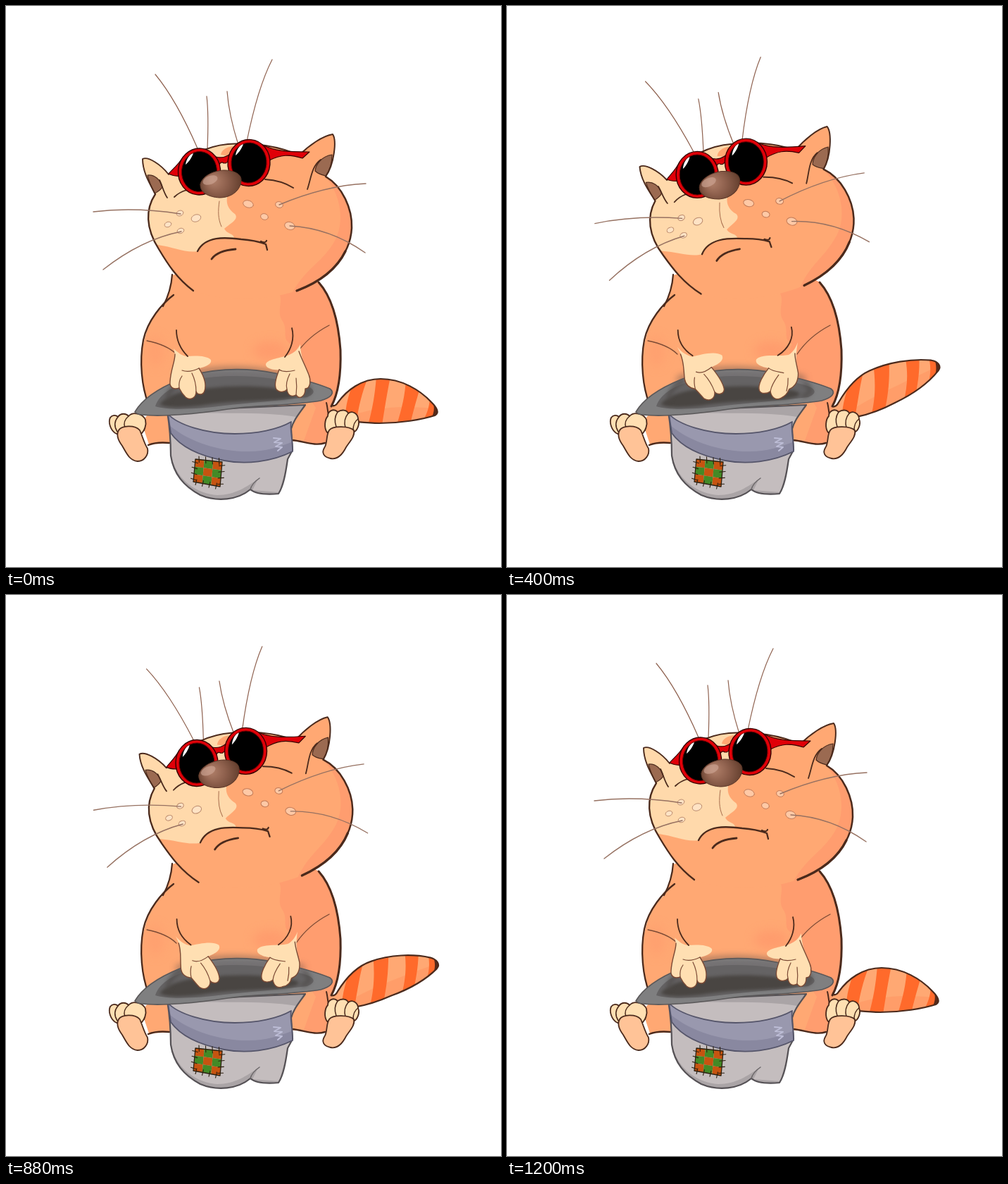
An HTML page with a canvas for the animation above (1.28 s loop, 703 px wide and 796 px high).

```html
<!DOCTYPE html>
<html lang="en">
<head>
<meta charset="utf-8">
<title>Cat with a hat</title>
<style>
html, body { margin: 0; width: 100%; height: 100%; overflow: hidden; background: #fff; }
canvas { display: block; width: 703px; height: 796px; }
</style>
</head>
<body>
<canvas id="stage" width="703" height="796"></canvas>
<script>
const ctx = document.getElementById('stage').getContext('2d');
const STEP = 80, LAST = 7, SLOTS = 16;
const INK = '#4b2a1c', THIN = '#7a4a35', SKIN = '#ffa873', SHADE = '#ff9d6f',
      CREAM = '#ffd9ab', PAW = '#ffdfb2', STRIPE = '#ff6a2b', RED = '#e00008';

ctx.lineCap = ctx.lineJoin = 'round';

const fill = (d, color) => {
  ctx.fillStyle = color;
  ctx.fill(new Path2D(d));
};
const line = (d, width = 2, color = INK) => {
  ctx.strokeStyle = color;
  ctx.lineWidth = width;
  ctx.stroke(new Path2D(d));
};
const shape = (d, color, width, ink) => {
  fill(d, color);
  line(d, width, ink);
};
const oval = (x, y, rx, ry, color, tilt = 0, width = 0, ink = INK) => {
  ctx.beginPath();
  ctx.ellipse(x, y, rx, ry, tilt, 0, Math.PI * 2);
  ctx.fillStyle = color;
  ctx.fill();
  if (width) {
    ctx.strokeStyle = ink;
    ctx.lineWidth = width;
    ctx.stroke();
  }
};
const clipped = (d, draw) => {
  ctx.save();
  ctx.clip(new Path2D(d));
  draw();
  ctx.restore();
};
const soft = (blur, draw) => {
  ctx.save();
  ctx.filter = `blur(${blur}px)`;
  draw();
  ctx.restore();
};
// Blend two paths of the same structure.
const mix = (a, b, u) => {
  const ends = b.match(/[\d.]+/g);
  let i = 0;
  return a.replace(/[\d.]+/g, n => (+n + (ends[i++] - n) * u).toFixed(2));
};

function tail(u) {
  const m = (a, b) => mix(a, b, u);
  const edge = m(
    'M460 566 C464 568 468 568 471 563 C484 545 505 529 532 529 C562 529 588 545 604 562 C612 570 616 577 609 581 C590 587 560 592 530 592 C518 592 508 591 497 590',
    'M460 569 C464 570 468 569 471 562 C480 545 490 526 508 513 C532 496 570 482 602 479 C612 478 618 484 614 492 C602 514 584 534 560 551 C540 564 516 575 497 580');
  const area = edge + ' L480 596 L462 580 Z';
  fill(area, SKIN);
  clipped(area, () => {
    fill(m('M463 595 C500 570 560 565 615 572 L600 600 L470 600 Z',
           'M463 590 C505 555 560 525 616 484 L604 540 L490 592 Z'), 'rgba(255,150,98,.55)');
    fill(m('M494 533 L514 527 C506 548 501 566 497 594 L482 592 C481 570 486 552 494 533 Z',
           'M487 527 L505 510 C499 532 499 553 492 584 L473 580 C475 560 480 545 487 527 Z'), STRIPE);
    fill(m('M526 526 L546 526 C541 550 538 570 534 595 L514 595 C521 570 524 550 526 526 Z',
           'M518 502 L541 492 C545 520 543 545 537 568 L518 578 C525 550 523 525 518 502 Z'), STRIPE);
    fill(m('M568 528 L588 541 C583 560 578 575 574 594 L555 594 C562 572 567 552 568 528 Z',
           'M564 484 L584 478 C588 500 586 518 582 539 L566 551 C572 526 571 506 564 484 Z'), STRIPE);
    fill(m('M602 557 L620 574 L612 586 L593 587 C598 578 601 569 602 557 Z',
           'M598 476 L620 476 L616 495 L600 517 C603 503 603 490 598 476 Z'), STRIPE);
    fill(m('M606 560 L620 574 L612 586 L604 584 C608 578 609 570 606 560 Z',
           'M606 474 L620 476 L616 495 L609 502 C611 493 611 484 606 474 Z'), '#5a2a18');
  });
  line(edge, 2.2);
}

function body() {
  const area = 'M236 382 C234 398 230 412 222 427 C202 446 193 475 192 508 C192 538 200 560 203 578 L196 586 L197 604 L203 622 L240 620 L400 617 C425 618 438 624 455 619 L460 575 C471 555 475 520 475 490 C474 450 465 414 444 392 L400 370 L280 370 Z';
  fill(area, SKIN);
  clipped(area, () => {
    fill('M380 400 C400 412 382 430 392 446 C402 460 390 472 405 480 C390 505 420 540 440 570 L420 625 L480 625 L480 390 L430 385 Z', SHADE);
    soft(7, () => {
      oval(375, 489, 24, 13, 'rgba(255,151,108,.7)');
      oval(212, 490, 12, 22, 'rgba(255,155,110,.55)');
    });
  });
  line('M236 381 C235 397 231 411 223 426', 2.2);
  line('M238 410 C222 422 201 446 195 474 C189 505 193 541 202 564 C203 569 203 574 202 578', 2.3);
  line('M444 392 C462 412 472 446 475 488 C476 520 473 548 462 568', 3);
  line('M455 563 C457 570 457 580 460 589', 2);
  line('M186 580 C196 582 199 590 196 602', 2);
  line('M202 623 C212 619 222 619 232 620', 2.4);
  line('M406 616 C422 617 438 625 453 620', 2.4);
}

function feet() {
  shape('M157 607 C148 603 145 590 148 584 C151 580 156 580 159 583 C163 577 171 578 174 582 C180 575 194 578 198 587 C200 595 196 603 193 606 Z', PAW, 1.8);
  line('M159 583 C154 589 153 596 158 604 M174 582 C168 587 167 593 169 598', 1.5);
  shape('M160 602 C164 595 183 594 190 602 C194 611 196 620 201 628 C203 637 196 646 187 646 C175 645 171 634 165 624 C159 616 156 609 160 602 Z', '#ffc397', 1.8);
  shape('M456 605 C451 598 453 586 457 582 C457 575 465 570 471 576 C477 572 484 573 486 578 C492 573 500 579 500 586 C503 593 499 603 493 605 Z', PAW, 1.8);
  line('M471 576 C467 582 466 589 469 597 M486 578 C481 584 480 591 482 598 M500 586 C494 590 493 596 493 602', 1.5);
  shape('M459 602 C464 595 488 596 494 602 C496 610 489 617 483 626 C478 636 471 644 461 642 C451 640 448 634 452 627 C457 620 454 610 459 602 Z', '#ffc397', 1.8);
}

function patch() {
  const at = (a, b) => [269 + a * 38 - b * 3, 643 + a * 4 + b * 32 + a * b * 3];
  for (let r = 0; r < 3; r++) for (let c = 0; c < 3; c++) {
    ctx.fillStyle = (r + c) % 2 ? '#438a26' : '#c65410';
    ctx.beginPath();
    [[c, r], [c + 1, r], [c + 1, r + 1], [c, r + 1]].forEach(([x, y]) => ctx.lineTo(...at(x / 3, y / 3)));
    ctx.fill();
  }
  line('M269 643 L307 647 L304 682 L266 675 Z', 1.3, '#2c2010');
  for (let i = 0; i < 4; i++) {
    const k = .12 + i * .25;
    [[k, -.14, k + .03, .12], [k, .88, k - .03, 1.12], [-.1, k, .1, k + .04], [.9, k + .05, 1.11, k]]
      .forEach(([a, b, c, d]) => line(`M${at(a, b)} L${at(c, d)}`, 1.1, '#2c2010'));
  }
}

function hat() {
  const crown = 'M229 575 C232 594 234 620 234 638 C238 664 252 681 276 694 C300 704 329 701 347 686 C355 693 375 693 387 692 C394 681 397 664 400 643 L407 630 L405 600 C408 588 416 579 425 566 Z';
  fill(crown, '#c4bdbe');
  clipped(crown, () => {
    fill('M235 640 C243 674 272 692 300 694 C325 694 342 682 358 671 L350 687 L388 690 L402 640 L400 700 L240 705 Z', '#aaa4a6');
    fill('M229 575 L425 565 L412 583 C360 574 290 581 229 575 Z', '#aaa4a6');
  });
  line(crown, 2.2, '#555155');
  line('M347 686 C349 678 354 674 360 670', 1.5, '#6a6668');

  const band = 'M230 579 C244 594 283 607 325 607 C356 607 386 601 405 590 C403 601 407 613 407 632 C377 647 340 651 310 645 C278 639 249 627 234 606 Z';
  fill(band, '#9998ae');
  clipped(band, () => fill('M231 594 C262 621 310 633 345 632 C370 632 390 625 410 617 L410 650 L280 655 L230 620 Z', '#8988a0'));
  line(band, 1.8, '#55556a');
  line('M380 613 L390 614 L381 619 L392 620 L383 625 L392 626 L386 631', 2, '#bdbdd6');
  patch();

  soft(5, () => line('M245 530 C285 512 345 512 420 529', 9, 'rgba(85,75,72,.5)'));
  const brim = 'M183 576 C194 557 220 541 247 530 C284 514 337 512 382 521 C415 528 443 536 460 543 C468 549 461 556 447 560 C405 567 358 566 315 572 C270 579 220 583 194 580 C189 580 185 578 183 576 Z';
  fill(brim, '#7f7f80');
  clipped(brim, () => {
    soft(3, () => oval(330, 531, 103, 13, '#747172'));
    fill('M212 568 C218 549 241 537 269 530 C315 521 375 525 420 537 C439 542 442 549 428 555 C385 560 346 563 310 567 C271 572 231 574 212 568 Z', '#656364');
    soft(2, () => fill('M218 565 C232 551 253 544 291 542 C332 537 375 540 408 546 C425 551 411 557 382 559 C337 561 306 562 277 567 C246 570 229 571 218 565 Z', '#494542'));
    soft(3, () => line('M230 556 C231 546 240 538 250 532 M421 553 C433 550 434 542 423 537', 5, '#504c4a'));
  });
  line(brim, 1.7, '#5a5859');
}

function hands(u) {
  const m = (a, b) => mix(a, b, u);
  line('M200 475 C220 479 234 486 242 494', 1.3, THIN);
  line('M459 453 C438 464 422 479 412 494', 1.3, THIN);

  const left = m(
    'M238 486 C244 492 250 496 256 497 C270 496 285 496 291 502 C293 508 283 512 274 514 C281 525 285 537 282 546 C280 553 272 552 270 547 C270 557 261 560 255 555 C249 549 248 546 246 542 C238 545 232 541 233 533 C234 515 243 500 238 486',
    'M243 483 C250 492 258 496 265 498 C278 494 300 486 311 493 C316 502 304 508 297 512 C306 522 316 534 319 543 C319 551 310 552 305 548 C306 558 298 562 290 558 C283 551 280 547 276 544 C266 541 262 534 260 528 C257 512 256 502 243 483');
  fill(left, PAW);
  const right = m(
    'M418 480 C414 488 409 492 402 495 C390 500 373 500 369 508 C368 514 380 517 388 516 C384 526 380 538 384 544 C388 549 396 548 399 544 C400 553 406 555 412 552 C416 558 425 556 425 543 C433 543 433 530 430 523 C424 508 418 497 418 480',
    'M411 476 C407 487 404 491 399 495 C384 497 356 490 348 499 C345 507 358 511 365 513 C356 522 346 537 348 546 C350 552 359 551 364 548 C366 557 372 562 380 558 C386 552 388 547 391 544 C402 538 406 530 407 520 C407 510 405 500 411 476');
  fill(right, PAW);

  // The thumbs fade into the fur, so only the lower edges are inked.
  line(m('M274 514 C281 525 285 537 282 546 C280 553 272 552 270 547 C270 557 261 560 255 555 C249 549 248 546 246 542 C238 545 232 541 233 533 C234 515 240 505 240 494',
         'M297 512 C306 522 316 534 319 543 C319 551 310 552 305 548 C306 558 298 562 290 558 C283 551 280 547 276 544 C266 541 262 534 260 528 C257 512 256 506 249 494'), 1.4, THIN);
  line(m('M388 516 C384 526 380 538 384 544 C388 549 396 548 399 544 C400 553 406 555 412 552 C416 558 425 556 425 543 C433 543 433 530 430 523 C424 508 419 499 416 490',
         'M365 513 C356 522 346 537 348 546 C350 552 359 551 364 548 C366 557 372 562 380 558 C386 552 388 547 391 544 C402 538 406 530 407 520 C407 510 405 504 406 494'), 1.4, THIN);
  line(m('M250 517 C258 520 266 518 274 514 M264 521 C268 529 270 538 270 547 M246 542 C245 534 247 529 250 525',
         'M276 520 C283 523 291 518 297 512 M286 523 C294 530 300 538 305 548 M276 544 C274 538 273 533 273 528'), 1.2, THIN);
  line(m('M388 516 C394 520 402 519 410 517 M403 522 C399 530 397 537 399 544 M412 552 C413 544 413 536 412 528',
         'M365 513 C371 518 379 519 386 522 M379 524 C373 531 367 539 364 548 M391 544 C393 538 394 533 394 528'), 1.2, THIN);
  line(m('M242 460 C242 475 248 487 258 497', 'M243 460 C243 475 250 487 266 496'), 1.8);
  line(m('M406 457 C410 472 405 487 396 498', 'M403 455 C407 470 398 486 380 495'), 1.8);
}

function glasses() {
  const rim = (x, y) => {
    oval(x, y, 30, 33, RED, .08, 1.4, '#300');
    oval(x, y, 25, 28.5, '#000', .08, 1, '#600');
  };
  shape('M251 215 C244 226 237 231 231 238 C238 242 244 241 249 242 Z', RED, 1.2, '#300');
  shape('M364 197 C382 206 399 207 431 207 L421 216 C402 210 390 211 374 219 Z', RED, 1.2, '#300');
  shape('M298 214 C306 216 312 215 320 209 L321 217 C317 222 315 220 312 223 L309 223 C307 221 304 222 303 225 Z', RED, 1.2, '#300');
  rim(274.5, 235);
  rim(345, 222.5);
  for (const [x, y] of [[0, 0], [71, -13]]) {
    fill(`M${266 + x} ${209 + y} C${261 + x} ${210 + y} ${256 + x} ${217 + y} ${255 + x} ${225 + y} C${259 + x} ${222 + y} ${264 + x} ${215 + y} ${266 + x} ${209 + y} Z`, '#fff');
  }
}

function nose() {
  const g = ctx.createRadialGradient(293, 247, 2, 304, 252, 30);
  g.addColorStop(0, '#b07f69');
  g.addColorStop(.5, '#8d5f4c');
  g.addColorStop(1, '#65402f');
  shape('M276 253 C278 242 293 234 309 233 C325 233 335 239 334 248 C333 262 320 272 303 272 C288 271 275 265 276 253 Z', g, 1, '#5b3627');
  oval(290, 247, 11, 6, 'rgba(205,165,148,.65)', -.35);
}

function head(u) {
  ctx.save();
  ctx.translate(326, 290);
  ctx.rotate(-6.6 * u * Math.PI / 180);
  ctx.translate(-326, -290);

  line('M212 97 C236 126 255 163 272 202 M285 128 C288 153 287 178 286 202 M314 121 C316 148 323 175 330 197 M378 76 C362 107 351 148 342 192', 1.2, '#8f6250');

  const area = 'M212 267 C203 250 194 235 194 217 C202 213 220 225 231 239 C250 220 280 199 315 196 C350 193 390 199 416 212 C430 198 450 184 464 182 C470 191 466 225 454 242 C478 256 492 288 491 315 C489 355 457 388 413 404 C365 420 305 420 266 404 C242 386 229 365 217 345 C198 315 198 288 212 267 Z';
  fill(area, SKIN);
  clipped(area, () => {
    fill('M448 236 C480 268 482 315 462 341 C444 367 425 374 407 406 L500 400 L500 240 Z', SHADE);
    fill('M185 205 L245 215 L290 195 L333 190 C326 205 325 235 322 255 C310 271 311 285 325 295 C332 303 317 309 310 316 C314 324 323 322 324 329 C300 326 281 332 272 348 C256 351 238 342 216 339 L190 330 Z', CREAM);
    fill('M305 211 C306 204 314 199 324 199 L322 214 Z', SKIN);
  });
  shape('M201 240 C211 239 219 246 222 257 C219 262 215 264 211 266 C207 258 203 249 201 240 Z', '#9b6a51', 1.2);
  shape('M463 211 C449 213 440 224 439 234 C444 239 450 240 454 241 C460 233 463 222 463 211 Z', '#9b6a51', 1.2);
  line('M218 247 C222 255 224 265 229 272', 1.8);
  line('M428 260 C433 246 434 227 447 218', 1.8);

  line('M231 239 C220 225 202 213 194 217 C194 235 203 250 212 267', 1.9);
  line('M212 267 C198 288 198 315 217 345 C229 365 242 386 266 404', 2.3);
  line('M236 234 C253 216 282 199 315 196 C350 193 390 199 416 212 C430 198 450 184 464 182 C470 191 466 225 454 242', 2);
  line('M454 242 C478 256 492 288 491 315 C489 355 457 388 413 404', 2.5);
  line('M482 348 C468 377 442 393 413 404', 3.3);
  line('M239 271 C244 266 250 263 257 261', 1.8);
  line('M368 246 C384 247 397 251 408 258', 2);
  line('M303 277 C301 291 301 302 306 313', 1, '#a66c4c');
  line('M272 348 C283 326 311 328 334 331 C350 332 361 335 369 338 L371 346 M362 334 C366 336 369 336 370 333', 2.3);
  line('M292 359 C299 349 313 346 326 345', 2.8);

  for (const [x, y, rx, ry] of [[247, 294, 5, 3.8], [230, 310, 5, 3.6], [270, 301, 7, 5], [248, 319, 5, 3.6]])
    oval(x, y, rx, ry, '#ffe3c5', -.35, 1, '#bb8b6d');
  for (const [x, y, rx, ry] of [[344, 281, 7.5, 5], [367, 299, 5.5, 4.3], [388, 282, 5.5, 4.3], [403, 312, 7.5, 5.4]])
    oval(x, y, rx, ry, '#ffc9a6', .3, 1, '#c17a57');
  line('M124 292 C165 287 209 289 248 295 M138 374 C171 348 209 328 249 320', 1.4, '#967161');
  line('M388 282 C424 267 467 254 511 252 M403 312 C443 314 480 329 510 350', 1.4, '#967161');

  glasses();
  nose();
  ctx.restore();
}

function draw(u) {
  ctx.fillStyle = '#fff';
  ctx.fillRect(0, 0, 703, 796);
  tail(u);
  body();
  feet();
  head(u);
  hat();
  hands(u);
}

let shown = -1;
function tick(now) {
  const slot = Math.floor(now / STEP) % SLOTS;
  const pose = slot <= LAST ? slot : SLOTS - 1 - slot;
  if (pose !== shown) draw((shown = pose) / LAST);
  requestAnimationFrame(tick);
}
tick(0);
</script>
</body>
</html>
```
